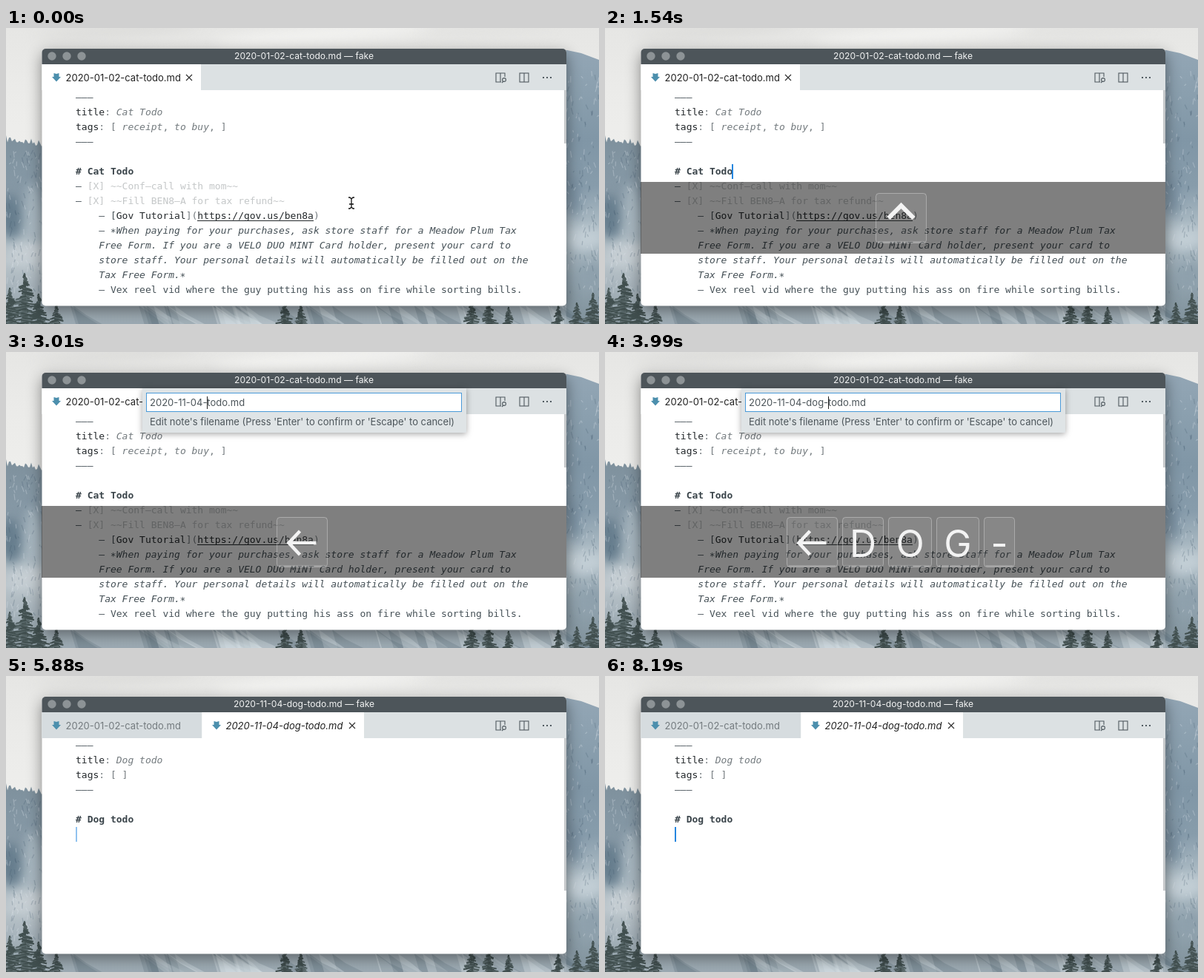
An HTML page with a canvas that plays this animation: 800 px wide and 400 px high, repeating every 8260 ms.

```html
<!DOCTYPE html>
<html lang="en">
<head>
<meta charset="utf-8">
<title>Cat todo, dog todo</title>
<style>
html, body { margin: 0; width: 800px; height: 400px; overflow: hidden; }
canvas { display: block; }
</style>
</head>
<body>
<canvas id="stage" width="800" height="400"></canvas>
<script>
const LOOP = 8260, STEP = 70;
const UI = 'Inter, "Liberation Sans", sans-serif';
const MONO = '"DejaVu Sans Mono", "Liberation Mono", monospace';
const INK = '#23282b', TEXT = '#465157', DIM = '#737a7e', FAINT = '#c4c7c8';

const PROMPT_OPEN = 1960, PROMPT_CLOSE = 4340, NOTE_OPEN = 4480;
const groups = [
  { start: 1050, end: 2380, keys: [[1050, '⌃', 69], [1820, 'N', 58]] },
  { start: 2730, end: 5250, keys: [
    [2730, '←', 69], [3290, 'D', 56], [3500, 'O', 59],
    [3710, 'G', 58], [3920, '-', 42], [4270, 'Enter', 142]] }
];

const ctx = document.getElementById('stage').getContext('2d');
const clamp = v => Math.max(0, Math.min(1, v));

function rect(c, color, x, y, w, h) {
  c.fillStyle = color;
  c.fillRect(x, y, w, h);
}

function poly(c, color, points) {
  c.fillStyle = color;
  c.beginPath();
  points.forEach(p => c.lineTo(...p));
  c.fill();
}

function stroke(color, width, ...paths) {
  ctx.strokeStyle = color;
  ctx.lineWidth = width;
  ctx.beginPath();
  for (const path of paths) path.forEach((p, i) => i ? ctx.lineTo(...p) : ctx.moveTo(...p));
  ctx.stroke();
}

function write(text, x, y, color, font, align = 'left') {
  ctx.font = font;
  ctx.fillStyle = color;
  ctx.textAlign = align;
  ctx.fillText(text, x, y);
  return x + ctx.measureText(text).width;
}

function gradient(c, y0, y1, colors) {
  const g = c.createLinearGradient(0, y0, 0, y1);
  colors.forEach((color, i) => g.addColorStop(i / (colors.length - 1), color));
  return g;
}

function makeBackdrop() {
  const canvas = document.createElement('canvas');
  canvas.width = 800;
  canvas.height = 400;
  const c = canvas.getContext('2d');
  let seed = 7;
  const rnd = () => (seed = seed * 16807 % 2147483647) / 2147483647;

  function blurs(size, blobs) {
    c.filter = `blur(${size}px)`;
    for (const [x, y, rx, ry, color] of blobs) {
      c.fillStyle = color;
      c.beginPath();
      c.ellipse(x, y, rx, ry, -.08, 0, 7);
      c.fill();
    }
    c.filter = 'none';
  }

  rect(c, gradient(c, 0, 160, ['#e6e6e4', '#ebebe9', '#eeeeec']), 0, 0, 800, 400);
  blurs(9, [[150, 4, 110, 8, '#dadad8'], [430, 8, 150, 10, '#f3f3f1'], [650, 3, 90, 8, '#e2e2e0']]);

  const slope = gradient(c, 145, 400, ['#7e909c', '#8396a3', '#8799a6', '#a5b4bd', '#bcc6cc', '#a3b0b8', '#8c9aa2']);
  const ridge = [[0, 400]];
  for (let x = 0; x <= 60; x += 2) ridge.push([x, 145 + x * .12 + rnd() * 10]);
  poly(c, slope, [...ridge, [60, 400]]);
  poly(c, gradient(c, 28, 400, ['#93a6b5', '#8a9fae', '#8096a6', '#879cab', '#b3c1c9', '#93a5b0', '#7f909a']),
    [[735, 400], [735, 29], [757, 30], [776, 34], [800, 43], [800, 400]]);
  rect(c, gradient(c, 372, 400, ['#abb8c0', '#9dabb4']), 48, 370, 708, 30);
  blurs(7, [[6, 255, 16, 30, '#667d8d'], [38, 250, 10, 40, '#aab9c2'], [30, 305, 28, 14, '#c6ced3'],
    [765, 225, 9, 30, '#788e9f'], [780, 285, 26, 14, '#c2ced5'], [790, 335, 18, 18, '#8ea0ac']]);

  // Fine rock, forest and snow texture
  c.lineWidth = 1.2;
  for (let i = 0; i < 300; i++) {
    const right = i % 2;
    const x = right ? 752 + rnd() * 48 : rnd() * 50;
    const y = right ? 55 + rnd() * 310 : 165 + rnd() * 210;
    c.strokeStyle = rnd() < .5 ? 'rgba(225,232,237,.3)' : 'rgba(63,88,108,.25)';
    c.beginPath();
    c.moveTo(x, y);
    c.lineTo(x + rnd() * 6 - 3, y + 2 + rnd() * 7);
    c.stroke();
  }
  for (let i = 0; i < 50; i++) {
    const x = 60 + rnd() * 700;
    poly(c, i % 2 ? 'rgba(216,224,229,.4)' : 'rgba(88,108,121,.25)',
      [[x, 375], [x + 18, 388], [x + 32 + rnd() * 20, 402], [x + 8, 402]]);
  }

  function tree(x, top, half) {
    for (let y = top; y < 404; y += .8) {
      const w = Math.min(half, 1 + (y - top) * .4) * (.4 + rnd() * .7);
      const side = rnd() < .5 ? -1 : 1;
      c.strokeStyle = rnd() < .7 ? '#425050' : '#5c6b6d';
      c.lineWidth = 2;
      c.beginPath();
      c.moveTo(x - side * w * .3, y - 1);
      c.lineTo(x + side * w, y + 2);
      c.stroke();
    }
  }
  for (const [x, top, half] of [[25, 332, 18], [5, 352, 13], [44, 360, 15], [68, 374, 13],
    [376, 370, 15], [398, 374, 18], [628, 369, 18], [652, 368, 22], [678, 378, 15],
    [745, 376, 15], [770, 372, 15], [792, 359, 16]]) tree(x, top, half);
  return canvas;
}
const backdrop = makeBackdrop();

// One line of the note: [text, colour, font style] segments from left to right.
function line(row, x, ...parts) {
  const y = 97.5 + row * 20;
  for (const [text, color = TEXT, style = ''] of parts)
    x = write(text, x, y, color, `${style} 13px ${MONO}`);
}

function header(title, ...tags) {
  line(0, 94, ['–––']);
  line(1, 94, ['title', INK], [': ', DIM], [title, DIM, 'italic']);
  line(2, 94, ['tags', INK], [': [ ', DIM], ...tags, [']', DIM]);
  line(3, 94, ['–––']);
  line(5, 94, ['# ' + title, '#3a444a', 'bold']);
}

function catNote() {
  header('Cat Todo', ['receipt', DIM, 'italic'], [', ', DIM], ['to buy', DIM, 'italic'], [', ', DIM]);
  line(6, 94, ['– '], ['[X] ~~Conf–call with mom~~', FAINT]);
  line(7, 94, ['– '], ['[X] ~~Fill BEN8–A for tax refund~~', FAINT]);
  line(8, 125.3, ['– ['], ['Gov Tutorial', INK], ['](', DIM], ['https://gov.us/ben8a', INK], [')', DIM]);
  rect(ctx, INK, 258, 260, 157, 1);
  line(9, 125.3, ['– ∗'], ['When paying for your purchases, ask store staff for a Meadow Plum Tax', TEXT, 'italic']);
  line(10, 125.3, ['Free Form. If you are a VELO DUO MINT Card holder, present your card to', TEXT, 'italic']);
  line(11, 125.3, ['store staff. Your personal details will automatically be filled out on the', TEXT, 'italic']);
  line(12, 125.3, ['Tax Free Form.', TEXT, 'italic'], ['∗']);
  line(13, 125.3, ['– Vex reel vid where the guy putting his ass on fire while sorting bills.']);
}

function caret(x, y, opacity) {
  ctx.globalAlpha = opacity;
  rect(ctx, '#2586df', x, y, 2, 20);
  ctx.globalAlpha = 1;
}

// Smooth blink: visible at 0, hidden at 500 ms, held at both ends.
function blink(ms) {
  const p = Math.abs(ms % 1000 - 500) / 500;
  const v = clamp((p - .4) / .4);
  return v * v * (3 - 2 * v);
}

function tab(x, w, name, active, style = '') {
  rect(ctx, active ? '#fff' : '#d6dcdf', x, 49, w, 35);
  poly(ctx, '#4c8fad', [[x + 16, 61], [x + 19.5, 62], [x + 23, 61], [x + 23, 66],
    [x + 25.5, 66], [x + 19.5, 72.5], [x + 13.5, 66], [x + 16, 66]]);
  write(name, x + 32, 71.5, active ? '#222' : '#747b7f', `${style} 13px ${UI}`);
  if (!active) return;
  const cx = x + w - 16;
  stroke('#333', 1.2, [[cx - 4, 63], [cx + 4, 71]], [[cx + 4, 63], [cx - 4, 71]]);
}

function toolbar() {
  const color = '#505a60';
  ctx.strokeStyle = color;
  ctx.lineWidth = 1.1;
  ctx.strokeRect(693, 61, 12, 12);
  stroke(color, 1.1, [[699, 61], [699, 73]],
    [[668, 73], [661, 73], [661, 61], [673, 61], [673, 66]],
    [[667, 61], [667, 73]], [[669, 74], [671, 72]]);
  ctx.beginPath();
  ctx.arc(672, 70, 2.4, 0, 7);
  ctx.stroke();
  for (const x of [724, 729, 734]) rect(ctx, color, x, 66, 2, 2);
}

function frameWindow(file) {
  ctx.save();
  ctx.shadowColor = 'rgba(0,0,0,.45)';
  ctx.shadowBlur = 20;
  ctx.shadowOffsetY = 7;
  ctx.fillStyle = '#fff';
  ctx.beginPath();
  ctx.roundRect(48.5, 28, 707.5, 347.5, 5);
  ctx.fill();
  ctx.restore();
  ctx.fillStyle = '#4d555a';
  ctx.beginPath();
  ctx.roundRect(48.5, 28, 707.5, 21, [5, 5, 0, 0]);
  ctx.fill();
  for (const x of [62, 82, 102]) {
    ctx.fillStyle = '#8d9396';
    ctx.beginPath();
    ctx.arc(x, 38, 5.7, 0, 7);
    ctx.fill();
  }
  write(file + ' — fake', 402, 42.3, '#f2f3f3', `12.1px ${UI}`, 'center');
  rect(ctx, '#dce1e3', 48.5, 49, 707.5, 35);
}

function prompt(t) {
  const presses = groups[1].keys.filter(k => k[0] <= t);
  const typed = 'dog-'.slice(0, Math.max(0, presses.length - 1));
  const font = `13px ${UI}`;
  ctx.save();
  ctx.shadowColor = 'rgba(0,0,0,.35)';
  ctx.shadowBlur = 8;
  ctx.shadowOffsetY = 2;
  rect(ctx, '#dfe4e6', 184, 49, 437, 60);
  ctx.restore();
  rect(ctx, '#4a9ad8', 189, 55, 426, 26);
  rect(ctx, '#fff', 190, 56, 424, 24);
  ctx.font = font;
  ctx.textAlign = 'left';
  const x = 194 + ctx.measureText('2020-11-04-' + typed).width;
  if (!presses.length) rect(ctx, '#b5d7fb', x, 60, ctx.measureText('todo').width, 17);
  write(`2020-11-04-${typed}todo.md`, 194, 73, '#4c555a', font);
  write("Edit note's filename (Press 'Enter' to confirm or 'Escape' to cancel)", 194, 99, '#4c555a', font);
  if (presses.length && (t - presses[presses.length - 1][0]) % 1000 < 500)
    rect(ctx, '#222', Math.round(x), 60, 1, 17);
}

function keycap(label, x, w) {
  const mid = x + w / 2, white = '#f3f3f3';
  ctx.beginPath();
  ctx.roundRect(x + .5, 223.5, w - 1, 67, 4);
  ctx.fillStyle = 'rgba(255,255,255,.06)';
  ctx.fill();
  ctx.strokeStyle = 'rgba(255,255,255,.32)';
  ctx.lineWidth = 1;
  ctx.stroke();
  rect(ctx, 'rgba(255,255,255,.22)', x + 3, 288, w - 6, 2);
  if (label === '⌃')
    stroke(white, 6, [[mid - 17, 257], [mid, 240], [mid + 17, 257]]);
  else if (label === '←')
    stroke(white, 4.5, [[mid - 17, 258], [mid + 19, 258]],
      [[mid - 3, 242], [mid - 18, 258], [mid - 3, 274]]);
  else write(label, mid, 277, white, `50px ${UI}`, 'center');
}

function keyPanel(t) {
  for (const { start, end, keys } of groups) {
    const alpha = Math.min(clamp((t - start) / 210), clamp((end + 210 - t) / 210));
    if (!alpha) continue;
    const shown = keys.filter(k => k[0] <= t);
    ctx.globalAlpha = alpha;
    rect(ctx, 'rgba(0,0,0,.5)', 48, 208, 708, 97);
    let x = Math.round(399 - (shown.reduce((sum, k) => sum + k[2] + 6, 0) - 6) / 2);
    for (const [, label, w] of shown) {
      keycap(label, x, w);
      x += w + 6;
    }
    ctx.globalAlpha = 1;
  }
}

function pointer() {
  const beam = [[[462, 229], [464, 229], [466, 231], [468, 229], [470, 229]], [[466, 231], [466, 242]],
    [[462, 244], [464, 244], [466, 242], [468, 244], [470, 244]], [[463, 238], [469, 238]]];
  stroke('#fff', 3, ...beam);
  stroke('#111', 1.3, ...beam);
}

function draw(t) {
  const opened = t >= NOTE_OPEN;
  const cat = '2020-01-02-cat-todo.md', dog = '2020-11-04-dog-todo.md';
  const asking = t >= PROMPT_OPEN && t < PROMPT_CLOSE;
  ctx.drawImage(backdrop, 0, 0);
  frameWindow(opened ? dog : cat);
  tab(48.5, opened ? 215.5 : 214.5, cat, !opened);
  if (opened) {
    rect(ctx, '#edf0f1', 264, 49, 1, 35);
    tab(264.5, 218.5, dog, true, 'italic');
    header('Dog todo');
    caret(94, 204, t < 5080 ? 1 : blink(t - 5080));
  } else {
    catNote();
    if (!asking) caret(171, 184, t < PROMPT_CLOSE ? blink(t + 400) : 1);
  }
  toolbar();
  rect(ctx, '#c6c9cb', 753, 84, 3, opened ? 206 : 72);
  if (asking) prompt(t);
  keyPanel(t);
  if (t < 1330) pointer();
}

const begin = performance.now();
function tick(now) {
  const t = Math.max(0, now - begin) % LOOP;
  draw(Math.floor(t / STEP) * STEP);
  requestAnimationFrame(tick);
}
draw(0);
requestAnimationFrame(tick);
</script>
</body>
</html>
```
